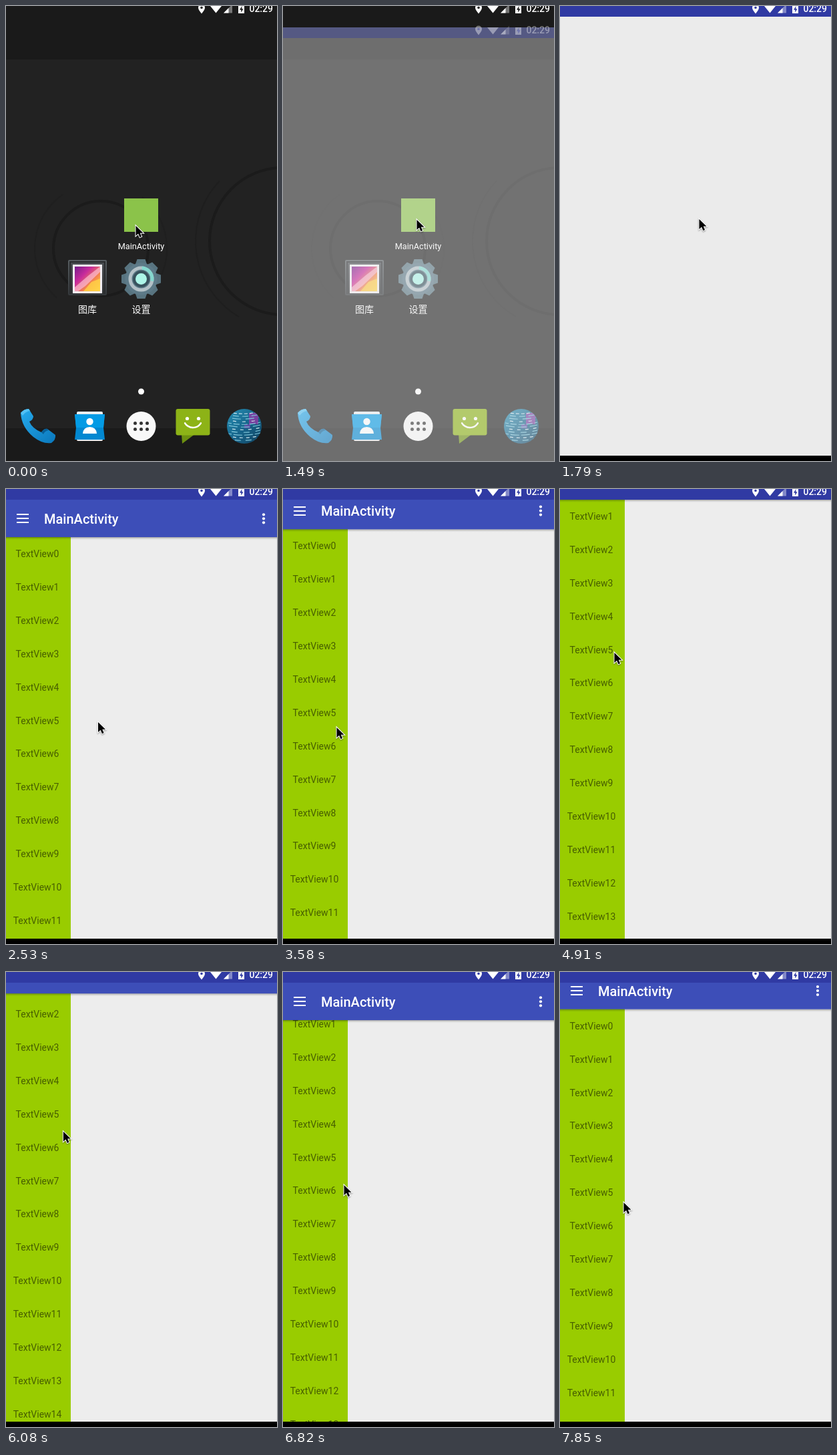
Write an HTML page with a canvas that moves like this. It is 406 by 681 pixels and loops after 8 s.

```html
<!DOCTYPE html>
<html lang="en">
<head>
<meta charset="utf-8">
<title>Collapsing toolbar</title>
<style>
html, body { margin: 0; width: 100%; height: 100%; overflow: hidden; background: #000; }
canvas { display: block; }
</style>
</head>
<body>
<canvas id="stage" width="406" height="681"></canvas>
<script>
const W = 406, H = 681, LOOP = 8000, TAU = Math.PI * 2;
const STATUS = 16, BAR = 56, NAV_TOP = 673, ROW = 49.9;
const ctx = document.getElementById('stage').getContext('2d');

// The screen refreshes in discrete steps; pairs are [ms, step].
const CLOCK = [[0, -2], [599.9, -2], [600, -1], [1349.9, -1], [1350, 0], [2380, 7], [2530, 8], [3430, 14],
  [3580, 15], [4610, 22], [4760, 23], [5790, 30], [5940, 31], [6970, 38], [7110, 39], [7850, 44]];

// Tracks are keyed by step.
const BAR_OFFSET = [[10, 0], [14, -8], [15, -11.7], [19.5, -56], [29.5, -56], [32, -29], [34.6, 0], [41, 0], [44, -16.3]];
const LIST_SCROLL = [[19.5, 0], [24, 50], [28.5, 94], [34.6, 94], [37, 69], [41, 0]];
const CURSOR_X = [[-2, 194], [-1, 197], [0, 200], [3, 208], [5, 195], [11, 80], [15, 80], [24, 81], [32, 86], [37, 91], [41, 95]];
const CURSOR_Y = [[-2, 329], [-1, 322], [0, 320], [3, 319], [5, 326], [11, 372], [13, 368], [15, 357], [24, 245],
  [28.5, 216], [29.5, 219], [32, 252], [37, 319], [41, 364], [44, 345]];

function track(keys, at) {
  if (at <= keys[0][0]) return keys[0][1];
  for (let i = 1; i < keys.length; i++) {
    const [a, va] = keys[i - 1], [b, vb] = keys[i];
    if (at <= b) return va + (vb - va) * (at - a) / (b - a);
  }
  return keys[keys.length - 1][1];
}

function rect(color, x, y, w, h) {
  ctx.fillStyle = color;
  ctx.fillRect(x, y, w, h);
}
function disc(color, x, y, r) {
  ctx.fillStyle = color;
  ctx.beginPath();
  ctx.arc(x, y, r, 0, TAU);
  ctx.fill();
}
function arc(color, width, x, y, r, from = 0, to = TAU) {
  ctx.strokeStyle = color;
  ctx.lineWidth = width;
  ctx.beginPath();
  ctx.arc(x, y, r, from, to);
  ctx.stroke();
}
function shape(color, d) {
  ctx.fillStyle = color;
  ctx.fill(new Path2D(d));
}
function round(color, x, y, w, h, r) {
  ctx.fillStyle = color;
  ctx.beginPath();
  ctx.roundRect(x, y, w, h, r);
  ctx.fill();
}
function gradient(x0, y0, x1, y1, ...colors) {
  const g = ctx.createLinearGradient(x0, y0, x1, y1);
  colors.forEach((c, i) => g.addColorStop(i / (colors.length - 1), c));
  return g;
}
function text(str, x, y, font, color, align = 'center') {
  ctx.font = font;
  ctx.fillStyle = color;
  ctx.textAlign = align;
  ctx.fillText(str, x, y);
}

function statusIcons(back) {
  shape('#fff', 'M293 11.5C290 7.5 288 5 288 2.5A5 5 0 0 1 298 2.5C298 5 296 7.5 293 11.5Z');
  disc(back, 293, 2.5, 1.8);
  shape('#fff', 'M306 0H323L314.5 10.5Z');
  shape('rgba(255,255,255,.4)', 'M326 10.5L339 -2.5V10.5Z');
  shape('#fff', 'M326 10.5L333.5 3V10.5Z');
  rect('#fff', 348, 0, 9, 11);
  shape(back, 'M353.5 0L350 5.8H352.3V9.8L355.5 4.3H353.3Z');
  text('02:29', 400, 9, '500 14px Roboto, sans-serif', '#fff', 'right');
}

function wallpaper() {
  rect('#222', 0, 0, W, H);
  arc('#1b1b1b', 4, 142, 363, 71);
  arc('#1f1f1f', 2, 142, 363, 99, 2.3, 4.1);
  arc('#1f1f1f', 2, 142, 363, 99, -0.9, 0.4);
  arc('#1b1b1b', 4, 415, 352, 110);
  arc('#1e1e1e', 2, 415, 352, 131, 2.1, 3.9);
  rect('#1a1a1a', 0, 0, W, 80);
  rect('#1a1a1a', 0, 632, W, H - 632);
}

function galleryIcon() {
  round(gradient(0, 380, 0, 433, '#565c60', '#34383b'), 93, 380, 58, 53, 2);
  rect('#2a2c2e', 95, 382, 54, 49);
  rect(gradient(0, 382, 0, 431, '#4a4e52', '#2e3133'), 97, 384, 50, 47);
  rect('#f1edf1', 100, 387, 44, 43);
  rect(gradient(104, 391, 140, 426, '#7b1d8c', '#c82a9c', '#f58a4b', '#ffd84a'), 103, 390, 38, 37);
  shape('rgba(255,196,220,.65)', 'M103 421L124 403L141 390V398L119 419L108 427H103Z');
  shape('rgba(255,210,70,.8)', 'M116 427L128 413L141 408V427Z');
}

function gearIcon() {
  ctx.save();
  ctx.translate(202.5, 408.5);
  for (let i = 0; i < 8; i++) {
    ctx.rotate(TAU / 8);
    shape('#587480', 'M-9 -21L-6 -29.5H6L9 -21Z');
  }
  disc('#5d7a88', 0, 0, 24);
  arc('#b3c1c7', 5, 0, 0, 16.5);
  arc('#84d8cf', 5, 0, 0, 16.5, -1.5, 0.2);
  disc('#37525d', 0, 0, 12.5);
  disc('#adf5e8', 0, 0, 8.5);
  ctx.restore();
}

function phoneIcon() {
  shape(gradient(25, 605, 70, 655, '#25a9ec', '#0b79bd'),
    'M22 609Q27 603 34 603L41 614Q41 619 35 622Q39 632 53 638Q57 632 62 633L74 642Q75 649 68 654Q55 656 41 645Q23 630 22 609Z');
  shape('#53c1f5', 'M22 609Q27 603 34 603L36 606Q29 607 25 613Z');
  shape('#075f98', 'M53 638Q57 632 62 633L64 635Q58 636 56 641Z');
}

function contactsIcon() {
  round('#e9eef1', 106, 607, 39, 44, 2);
  shape('#0288d1', 'M103 611H148L146 631L148 649H103L105 631Z');
  shape('#039be5', 'M103 611H148L146 631H105Z');
  disc('#fff', 125.5, 622, 5.2);
  shape('#fff', 'M115 640Q116 630 125.5 630Q135 630 136 640Z');
}

function drawerIcon() {
  disc('#f8f8f8', 202.5, 629, 22);
  for (let i = 0; i < 6; i++) disc('#333', 193.5 + i % 3 * 9, 624.5 + (i > 2) * 9, 2.5);
}

function messageIcon() {
  shape('#6d9010', 'M263 640H284L264 655Z');
  round('#8db317', 254.5, 603, 51, 39.5, 3);
  disc('#fff', 271.5, 617.5, 2.6);
  disc('#fff', 288.5, 617.5, 2.6);
  ctx.lineCap = 'round';
  arc('#fff', 2.5, 280, 617, 14, 0.55, Math.PI - 0.55);
  ctx.lineCap = 'butt';
}

function globeIcon() {
  ctx.save();
  ctx.beginPath();
  ctx.arc(357, 629, 26, 0, TAU);
  ctx.clip();
  rect(gradient(335, 608, 378, 652, '#2488ad', '#17668c', '#124766'), 331, 603, 52, 52);
  rect('rgba(200,40,180,.55)', 364, 609, 14, 17);
  rect('rgba(170,50,190,.45)', 357, 626, 9, 6);
  // Short light dashes suggest the land masses.
  for (let row = 0; row < 11; row++) {
    const y = 608 + row * 4;
    ctx.strokeStyle = row % 3 ? '#7cc3d8' : '#d0e6ef';
    ctx.lineWidth = 1.2;
    ctx.setLineDash([5 + row % 3 * 4, 3 + row % 4 * 2]);
    ctx.lineDashOffset = row * 7;
    ctx.beginPath();
    ctx.moveTo(333, y);
    ctx.quadraticCurveTo(357, y + 5, 381, y - 1);
    ctx.stroke();
  }
  ctx.setLineDash([]);
  ctx.restore();
}

function launcher() {
  wallpaper();
  statusIcons('#1a1a1a');
  rect('#8bc34a', 177, 288, 51, 50);
  galleryIcon();
  gearIcon();
  text('MainActivity', 202.5, 364, '12.7px Roboto, sans-serif', '#fff');
  text('图库', 122, 459, '14px "Noto Sans CJK SC", "Noto Sans CJK", sans-serif', '#fff');
  text('设置', 202.5, 459, '14px "Noto Sans CJK SC", "Noto Sans CJK", sans-serif', '#fff');
  disc('#fff', 202.5, 577, 4.5);
  phoneIcon();
  contactsIcon();
  drawerIcon();
  messageIcon();
  globeIcon();
}

function list(top, scroll) {
  rect('#9c0', 0, STATUS, 97, NAV_TOP - STATUS);
  for (let i = 0; i < 16; i++) {
    text('TextView' + i, 47, top + 30 - scroll + i * ROW, '14px Roboto, sans-serif', 'rgba(0,0,0,.54)');
  }
}

function toolbar(offset) {
  const bottom = STATUS + BAR + offset, mid = 44.3 + offset;
  rect(gradient(0, bottom, 0, bottom + 4, 'rgba(0,0,0,.32)', 'rgba(0,0,0,.1)', 'rgba(0,0,0,0)'), 0, bottom, W, 4);
  rect('#3d4eb8', 0, STATUS + offset, W, BAR);
  for (const dy of [-6, 0, 6]) {
    rect('#fff', 16, Math.round(mid + dy - 1), 18, 2);
    disc('#fff', 386, mid + dy, 2.1);
  }
  text('MainActivity', 57, 52 + offset, '500 20px Roboto, sans-serif', '#fff', 'left');
}

function activity(step) {
  const ready = step >= 4;
  rect(ready ? '#ededed' : '#ebebeb', 0, 0, W, NAV_TOP);
  if (ready) {
    const offset = track(BAR_OFFSET, step);
    ctx.save();
    ctx.beginPath();
    ctx.rect(0, STATUS, W, NAV_TOP - STATUS);
    ctx.clip();
    list(STATUS + BAR + offset, track(LIST_SCROLL, step));
    toolbar(offset);
    ctx.restore();
  }
  rect('#303aa3', 0, 0, W, STATUS);
  statusIcons('#303aa3');
  rect('#000', 0, NAV_TOP, W, H - NAV_TOP);
}

function cursor(x, y) {
  ctx.save();
  ctx.translate(x + 0.5, y);
  const arrow = new Path2D('M0 0V15L3.6 11.8L6 17.2L8.6 16L6.3 10.8H11Z');
  ctx.shadowColor = 'rgba(0,0,0,.4)';
  ctx.shadowBlur = 2;
  ctx.shadowOffsetY = 1;
  ctx.strokeStyle = '#fff';
  ctx.lineWidth = 2;
  ctx.stroke(arrow);
  ctx.shadowColor = 'transparent';
  ctx.fillStyle = '#000';
  ctx.fill(arrow);
  ctx.restore();
}

function draw(ms) {
  const step = Math.floor(track(CLOCK, ms) + 0.02);
  if (step < 2) launcher();
  if (step >= 0) {
    ctx.save();
    ctx.globalAlpha = track([[0, 0.4], [1, 0.92], [2, 1]], step);
    ctx.translate(0, track([[0, 32], [1, 7], [2, 0]], step));
    activity(step);
    ctx.restore();
  }
  cursor(track(CURSOR_X, step), track(CURSOR_Y, step));
}

const start = performance.now();
function tick() {
  draw((performance.now() - start) % LOOP);
  requestAnimationFrame(tick);
}
tick();
</script>
</body>
</html>
```
